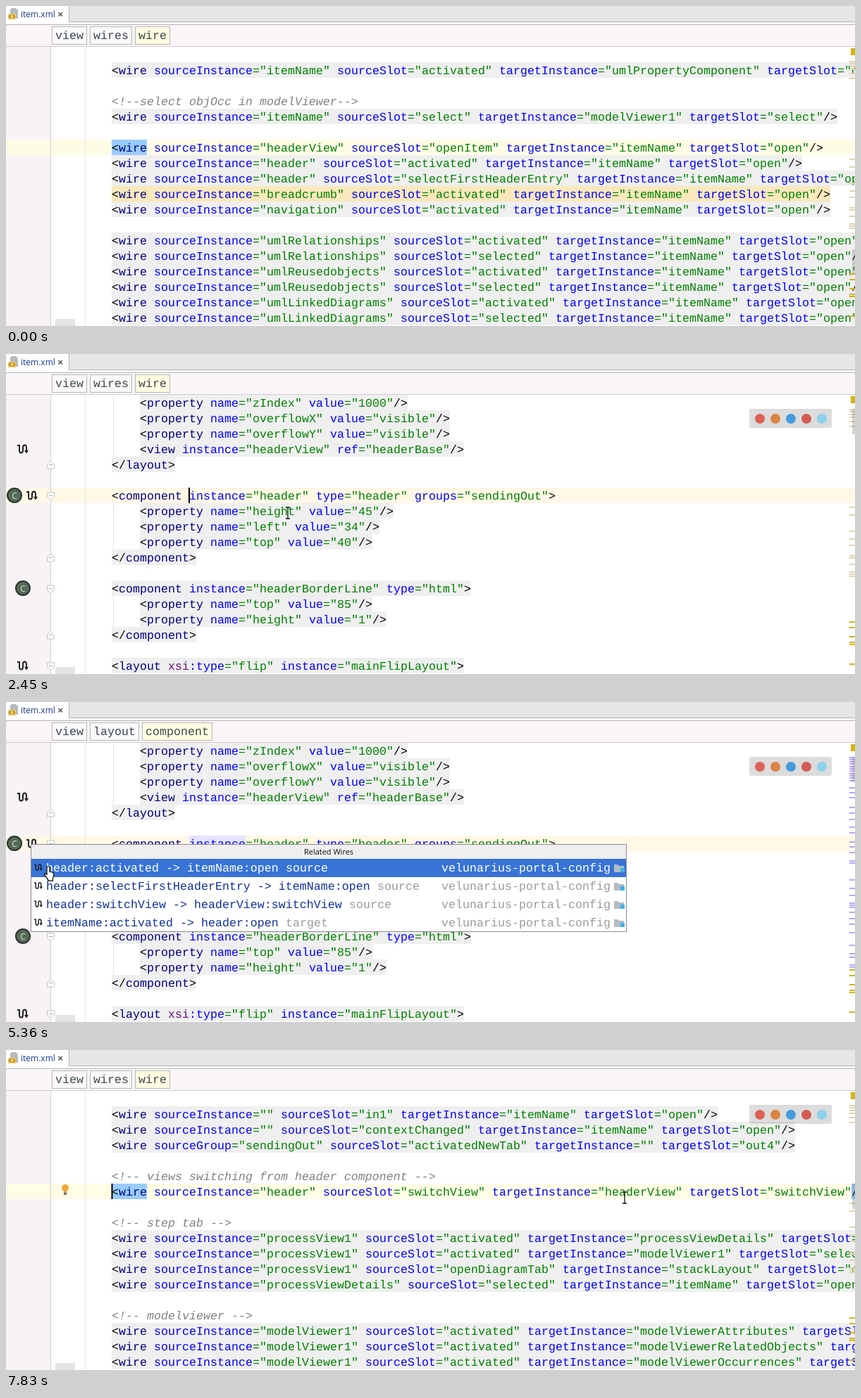
An HTML page that plays this animation: 1205x455 px, repeating every 7.99 s.

```html
<!DOCTYPE html>
<html lang="en">
<head>
<meta charset="utf-8">
<title>Wire navigation</title>
<style>
html, body { margin: 0; width: 100%; height: 100%; overflow: hidden; background: #fff; }
svg { display: block; width: 1205px; height: 455px; }
text { white-space: pre; }
.m { font: 16.6667px "Liberation Mono", monospace; text-rendering: geometricPrecision; }
.u { font-family: "Open Sans", sans-serif; }
</style>
</head>
<body>
<svg id="stage" viewBox="0 0 1205 455"></svg>
<script>
const LOOP = 7990, COL = 10, LEFT = 150;
const stage = document.getElementById('stage');

function el(tag, attrs, parent = stage, text) {
  const e = document.createElementNS('http://www.w3.org/2000/svg', tag);
  for (const k in attrs) e.setAttribute(k, attrs[k]);
  if (text !== undefined) e.textContent = text;
  parent.appendChild(e);
  return e;
}
const group = (parent = stage) => el('g', {}, parent);
const rect = (x, y, width, height, fill, parent, more) =>
  el('rect', { x, y, width, height, fill, ...more }, parent);
const path = (d, stroke, parent, more) => el('path', { d, stroke, fill: 'none', ...more }, parent);
const circle = (cx, cy, r, fill, parent, more) => el('circle', { cx, cy, r, fill, ...more }, parent);
const mono = (x, y, s, fill, parent) => el('text', { x, y, fill, class: 'm' }, parent, s);
const show = (e, on) => e.setAttribute('display', on ? 'inline' : 'none');
const move = (e, x, y) => e.setAttribute('transform', `translate(${x} ${y})`);
const rowTop = k => 58 + 22 * k;

// Code listings: [row, indent in columns, text]
const wire = (from, slot, to, target) =>
  `<wire sourceInstance="${from}" sourceSlot="${slot}" targetInstance="${to}" targetSlot="${target}"/>`;
const open = (from, slot) => wire(from, slot, 'itemName', 'open');
const prop = (name, value) => `<property name="${name}" value="${value}"/>`;

const wiresList = [
  [1, 0, wire('itemName', 'activated', 'umlPropertyComponent', 'open')],
  [3, 0, '<!--select objOcc in modelViewer-->'],
  [4, 0, wire('itemName', 'select', 'modelViewer1', 'select')],
  [6, 0, open('headerView', 'openItem')],
  [7, 0, open('header', 'activated')],
  [8, 0, open('header', 'selectFirstHeaderEntry')],
  [9, 0, open('breadcrumb', 'activated')],
  [10, 0, open('navigation', 'activated')],
  ...['umlRelationships', 'umlReusedobjects', 'umlLinkedDiagrams'].flatMap((n, i) =>
    ['activated', 'selected'].map((s, j) => [12 + 2 * i + j, 0, open(n, s)]))
];
const layoutList = [
  [0, 4, prop('zIndex', 1000)],
  [1, 4, prop('overflowX', 'visible')],
  [2, 4, prop('overflowY', 'visible')],
  [3, 4, '<view instance="headerView" ref="headerBase"/>'],
  [4, 0, '</layout>'],
  [6, 0, '<component instance="header" type="header" groups="sendingOut">'],
  [7, 4, prop('height', 45)],
  [8, 4, prop('left', 34)],
  [9, 4, prop('top', 40)],
  [10, 0, '</component>'],
  [12, 0, '<component instance="headerBorderLine" type="html">'],
  [13, 4, prop('top', 85)],
  [14, 4, prop('height', 1)],
  [15, 0, '</component>'],
  [17, 0, '<layout xsi:type="flip" instance="mainFlipLayout">']
];
const switchList = [
  [1, 0, open('', 'in1')],
  [2, 0, open('', 'contextChanged')],
  [3, 0, '<wire sourceGroup="sendingOut" sourceSlot="activatedNewTab" targetInstance="" targetSlot="out4"/>'],
  [5, 0, '<!-- views switching from header component -->'],
  [6, 0, wire('header', 'switchView', 'headerView', 'switchView')],
  [8, 0, '<!-- step tab -->'],
  [9, 0, wire('processView1', 'activated', 'processViewDetails', 'open')],
  [10, 0, wire('processView1', 'activated', 'modelViewer1', 'select')],
  [11, 0, wire('processView1', 'openDiagramTab', 'stackLayout', 'open')],
  [12, 0, open('processViewDetails', 'selected')],
  [14, 0, '<!-- modelviewer -->'],
  ...['Attributes', 'RelatedObjects', 'Occurrences'].map((n, i) =>
    [15 + i, 0, wire('modelViewer1', 'activated', 'modelViewer' + n, 'open')])
];

// Page chrome
rect(0, 0, 1205, 455, '#fff');
rect(0, 0, 1205, 23, '#e6e6e6');
rect(0, 0, 89, 27, '#fff');
rect(90, 23, 1115, 3, '#fafafa');
path('M89.5 0V22.5H1205M0 26.5H1205', '#b4b4b4');
rect(0, 27, 1205, 30, '#f9f5f8');
rect(0, 58, 64, 397, '#f8f3f7');
path('M8 3h6l3 3v12H6V5z', 'none', stage, { fill: '#b3bac0' });
rect(3, 11, 11, 8, '#efc75a');
path('M7 12.5l-2.5 2.5 2.5 2.5M10 12.5l2.5 2.5-2.5 2.5', '#65430a');
el('text', { x: 21, y: 16, fill: '#17398f', class: 'u', 'font-size': 12 }, stage, 'item.xml');
path('M74.5 9l5.5 5.5M80 9l-5.5 5.5', '#555', stage, { 'stroke-width': 1.5 });

function crumbs(names) {
  const g = group();
  let x = 65;
  names.forEach((n, i) => {
    const w = n.length * COL + 10;
    rect(x + .5, 29.5, w - 1, 25, i === names.length - 1 ? '#fffde0' : '#faf8f9', g, { stroke: '#b5b5b5' });
    mono(x + 5, 47, n, '#3c4a50', g);
    x += w + 4;
  });
  return g;
}
const wireCrumbs = crumbs(['view', 'wires', 'wire']);
const partCrumbs = crumbs(['view', 'layout', 'component']);

// Editor layers: tag backgrounds, caret row, highlights, text
function backs(list) {
  const g = group();
  for (const [k, ind, s] of list) {
    if (s.startsWith('<!')) continue;
    rect(LEFT + ind * COL, rowTop(k), s.length * COL, 22, '#efefef', g);
  }
  return g;
}
const lists = [wiresList, layoutList, switchList];
const backGroups = lists.map(backs);
rect(LEFT, rowTop(9), 1020, 22, '#f9e8bc', backGroups[0]);

const caretRow = rect(0, 0, 1205, 22, '#fffbe6');
path('M0 57.5H1205', '#cfcbce');
path('M63.5 58V455', '#d0cdd0');
path('M112.5 58V455', '#e2e2e2');
rect(70, 445, 28, 10, '#e4e4e4');
const selWire = rect(LEFT, 190, 50, 22, '#99ccff');
const selOpen = rect(LEFT, 190, 10, 22, '#99ccff');
const selEnd = rect(1200, 190, 5, 22, '#99ccff');
const selAttr = rect(260, 190, 80, 22, '#e4e4ff');

const TOKEN = /(<!--.*?-->)|(<\/?|\/?>)|(\w+(?=:))|(:?\w+(?==))|(="[^"]*")|(\w+)/g;
const INK = ['#808080', '#000', '#660e7a', '#0000ff', '#008000', '#000080'];
function code(list) {
  const g = group();
  for (const [k, ind, s] of list) {
    const line = el('text', { y: rowTop(k) + 17, class: 'm' }, g);
    for (const m of s.matchAll(TOKEN)) {
      const kind = m.slice(1).findIndex(v => v !== undefined);
      const span = el('tspan', { x: LEFT + (ind + m.index) * COL, fill: INK[kind] }, line, m[0]);
      if (kind === 0) span.setAttribute('font-style', 'italic');
    }
  }
  return g;
}
const codeGroups = lists.map(code);

function wireIcon(x, y, scale, parent) {
  const g = el('g', { transform: `translate(${x} ${y}) scale(${scale})` }, parent);
  path('M-8-5H-5V2Q-5 5.5-2.5 5.5T0 2V-2Q0-5.5 2.5-5.5T5-2V4', '#222', g, { 'stroke-width': 2 });
  path('M2 2H8L5 6.5Z', 'none', g, { fill: '#222' });
}
function typeIcon(x, y, parent) {
  circle(x, y, 10, '#566a59', parent, { stroke: '#2b332d', 'stroke-width': 2 });
  el('text', { x, y: y + 4.5, fill: '#cfe3d0', class: 'u', 'font-size': 12, 'text-anchor': 'middle' }, parent, 'C');
}
function fold(y, up, parent) {
  const s = up ? -1 : 1;
  path(`M58.5 ${y - 5 * s}h10v${6 * s}l-5 ${5 * s}l-5 ${-5 * s}z`, '#c2c2c2', parent, { fill: '#fff' });
  path(`M61 ${y - .5}h5`, '#aaa', parent);
}
const layoutCode = codeGroups[1];
path('M152.5 58V146M152.5 212V278M152.5 344V388', '#e4e4e4', layoutCode);
[[24, 135], [37, 201], [24, 443]].forEach(([x, y]) => wireIcon(x, y, 1, layoutCode));
typeIcon(12, 201, layoutCode);
typeIcon(24, 333, layoutCode);
[158, 202, 290, 334, 400, 444].forEach((y, i) => fold(y, i % 2 === 0, layoutCode));

const caret = rect(-1, 0, 2, 22, '#000');
const bulb = group();
circle(84, 196, 5, '#f2a73b', bulb);
rect(82, 200, 4, 3, '#e09a3a', bulb);
rect(82, 203, 4, 3, '#777', bulb);

// Marker stripe
function marks(ys, fill) {
  const g = group();
  ys.forEach(y => rect(1197, y, 8, 2, fill, g));
  return g;
}
const tan = marks([78, 81, 85, 89, 95, 102, 217, 228, 251, 262, 271, 286, 289, 298, 309, 312, 315], '#e2d3b0');
const lilac = marks([80, 84, 92, 97], '#cbbcf5');
const purple = marks([78, 81, 84, 87, 91, 94, 97, 101, 104, 107, 111, 121, 128, 135, 149, 157, 166, 177,
  185, 198, 205, 213, 225, 228, 252, 264, 274, 285, 288, 291, 298, 307, 315, 327, 345, 357, 362, 373, 376], '#b9a5fb');
marks([380, 388, 401, 409, 412, 440], '#d3b416');
rect(1199, 60, 6, 10, '#d4b410');
const thumb = rect(1201, 0, 4, 36, '#777', stage, { opacity: .3 });

// Browser panel
const panel = group();
rect(1055, 78, 117, 27, 'rgba(130,130,130,.28)', panel, { rx: 3 });
['#dd4b3e', '#dc7326', '#2a8fdc', '#d4433c', '#7fd0ef'].forEach((c, i) =>
  circle(1070 + 22 * i, 92, 7, c, panel, { opacity: .85 }));

// Popup
const popup = group();
rect(35.5, 202.5, 845, 124, '#fff', popup, { stroke: '#8c8c8c' });
rect(36, 203, 844, 20, '#f0eef0', popup);
el('text', { x: 458, y: 217, class: 'u', 'font-size': 11, 'text-anchor': 'middle', fill: '#111' }, popup, 'Related Wires');
const bar = rect(36, 223, 844, 26, '#3874d6', popup);
const entries = [
  ['header:activated -> itemName:open', 'source'],
  ['header:selectFirstHeaderEntry -> itemName:open', 'source'],
  ['header:switchView -> headerView:switchView', 'source'],
  ['itemName:activated -> header:open', 'target']
].map(([name, kind], i) => {
  const y = 241 + 26 * i;
  wireIcon(46, y - 6, .75, popup);
  const parts = [
    mono(57, y, name, '', popup),
    mono(57 + (name.length + 1) * COL, y, kind, '', popup),
    mono(618, y, 'velunarius-portal-config', '', popup)
  ];
  path(`M863 ${y - 10}h5l2 2h7v9h-14z`, 'none', popup, { fill: '#b4bcc4' });
  rect(872, y - 5, 6, 6, '#3fb2e5', popup);
  return parts;
});

// Pointers
const beam = path('M-3-8H3M-3 8H3M0-8V8', '#111', stage, { 'stroke-width': 1.3 });
const hand = path('M-2 1q2-3 4 0v6l4 1.2q2 .5 2 3l-1.5 6v3h-7v-2l-5-7q0-2.5 3.5 0z', '#000', stage,
  { fill: '#fff', 'stroke-width': 1.2 });

// Pointer legs: start, end, number of steps, x, y reached
const legs = [
  [610, 1480, 9, 400, 226],
  [2790, 3160, 4, 316, 236],
  [3320, 3720, 6, 53, 207],
  [3870, 4100, 3, 36, 202],
  [4500, 4650, 2, 42, 205],
  [5120, 5360, 3, 60, 234],
  [5440, 6060, 5, 113, 285],
  [6560, 7110, 5, 250, 262],
  [7270, 7830, 7, 878, 210]
];
function stepped(t, a, b, n) {
  if (t < a) return 0;
  if (t >= b) return 1;
  return (Math.floor((t - a) / (b - a) * (n - 1)) + 1) / n;
}
function pointer(t) {
  let x = 68, y = 460;
  for (const [a, b, n, tx, ty] of legs) {
    const p = stepped(t, a, b, n);
    x += (tx - x) * p;
    y += (ty - y) * p;
  }
  return [x, y];
}

function draw(t) {
  const within = (a, b) => t >= a && t < b;
  const screen = t < 2450 ? 0 : t < 6300 ? 1 : 2;
  backGroups.forEach((g, i) => show(g, i === screen));
  codeGroups.forEach((g, i) => show(g, i === screen));

  const inPart = within(2576, 6640);
  show(partCrumbs, inPart);
  show(wireCrumbs, !inPart);

  caretRow.setAttribute('y', rowTop(within(1710, 2450) ? 7 : 6));
  caretRow.setAttribute('fill', screen === 1 ? '#fff8e6' : '#fffce6');
  show(selWire, t < 1710 || t >= 6640);
  show(selOpen, within(6300, 6640));
  show(selEnd, screen === 2);
  show(selAttr, within(2790, 6300));
  show(bulb, t >= 6972);

  const onCaret = within(1710, 2790) || within(3160, 3720) || within(4100, 4340) ||
    within(6300, 6835) || t >= 7363;
  show(caret, onCaret);
  move(caret, screen === 0 ? 400 : screen === 1 ? 260 : 150.5, screen === 0 ? 212 : 190);

  const usages = within(2893, 6700);
  show(purple, usages);
  show(tan, !usages);
  show(lilac, within(1710, 2450));
  thumb.setAttribute('y', [346, 78, 190][screen]);
  panel.setAttribute('opacity', stepped(t, 610, 936, 4));

  const [x, y] = pointer(t);
  const isHand = within(3870, 6220);
  show(beam, t >= 610 && !isHand);
  show(hand, isHand);
  move(beam, Math.round(x), Math.round(y));
  move(hand, Math.round(x), Math.round(y));

  show(popup, within(4340, 6220));
  const pick = Math.max(0, Math.min(3, Math.floor((y - 223) / 26)));
  bar.setAttribute('y', 223 + 26 * pick);
  entries.forEach((parts, i) => parts.forEach((p, j) =>
    p.setAttribute('fill', i === pick ? '#fff' : j ? '#9b9b9b' : '#12309a')));
}

const begin = performance.now();
function tick() {
  draw((performance.now() - begin) % LOOP);
  requestAnimationFrame(tick);
}
draw(0);
requestAnimationFrame(tick);
</script>
</body>
</html>
```
